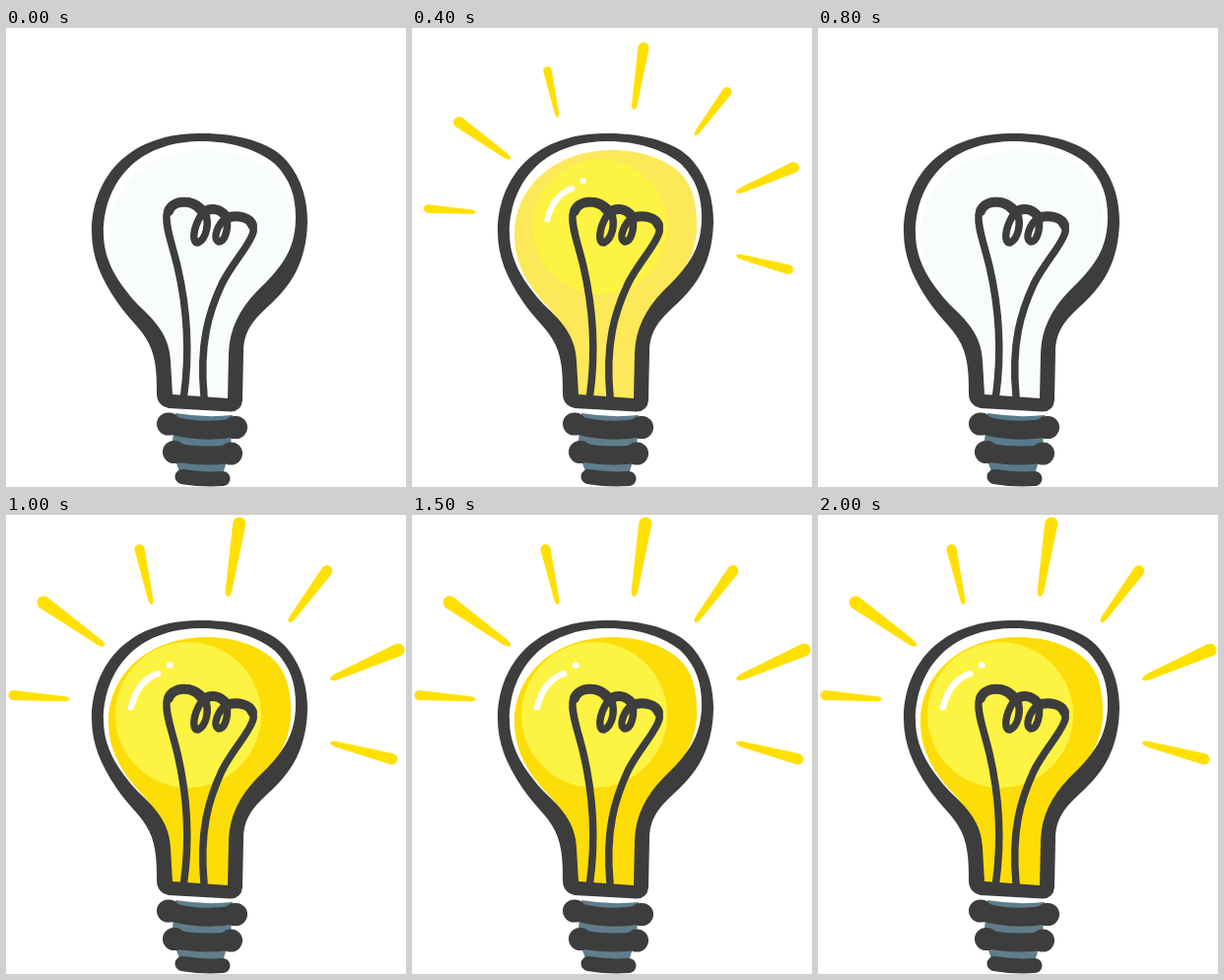
Recreate the animation shown at these times as an HTML page. Size 406 px wide and 466 px high, loop 2200 ms.

```html
<!DOCTYPE html>
<html lang="en">
<head>
<meta charset="utf-8">
<title>Light bulb</title>
<style>
  html, body { margin: 0; width: 100%; height: 100%; overflow: hidden; background: #fff; }
  svg { display: block; width: 100vw; height: 100vh; }
</style>
</head>
<body>
<svg viewBox="0 0 406 466">
  <defs>
    <path id="ray" d="M0 0Q1 -2.500 6 -3.200L73 -6.400A6.400 6.400 0 0 1 73 6.400L6 3.200Q1 2.500 0 0Z"/>
  </defs>
  <g id="rays" fill="#ffe000">
    <use href="#ray" transform="translate(65 187) rotate(184) scale(.79)"/>
    <use href="#ray" transform="translate(100 133) rotate(215.500) scale(1.04)"/>
    <use href="#ray" transform="translate(148 91) rotate(257.500) scale(.79)"/>
    <use href="#ray" transform="translate(225 83) rotate(279) scale(1.03)"/>
    <use href="#ray" transform="translate(287 109) rotate(306.500) scale(.89)"/>
    <use href="#ray" transform="translate(329 167) rotate(336.500) scale(1.03)"/>
    <use href="#ray" transform="translate(329 231) rotate(15) scale(.89)"/>
  </g>
  <path id="body" d="M200 124C228 123 257 132 272 147C286 161 290 182 289 206C287 236 270 255 252 273C235 294 230 310 230 335V380H164L162 335C160 310 150 296 133 278C116 258 104 238 104 210C104 165 140 126 200 124Z"/>
  <g id="glow">
    <circle r="74" fill="#fdf343"/>
    <g fill="none" stroke="#fff" stroke-linecap="round">
      <path d="M-58 -8Q-51 -35 -31 -42" stroke-width="6.500"/>
      <path d="M-19 -50.500h.5" stroke-width="6.500"/>
    </g>
  </g>
  <path id="metal" d="M172 391Q202 396 230 393L228 428L219 456H178L168 428Z"/>
  <g fill="none" stroke="#3d3d3d" stroke-linecap="round" stroke-linejoin="round">
    <path fill="#3d3d3d" fill-rule="evenodd" stroke="none" d="M195 107C228 106 268 114 285 135C301 154 306 176 306 197C305 238 289 261 270 279C250 297 241 308 241 330L240 378Q239 389 228 389.500L165 386Q153 383 153 371C153 348 152 331 142 315C135 303 124 295 112 277C96 253 87 232 87 207C87 158 118 108 195 107ZM195 115C125 117 99 165 99 208C99 236 113 258 134 281C151 297 166 312 167 338L169 372L225 376L226 330C227 305 237 286 254 268C279 244 294 226 294 192C294 172 289 154 273 138C256 123 225 114 195 115Z"/>
    <path stroke-width="7.500" d="M180.500 374C187 327 184 285 174 242C168 217 162 203 163 190C166 173 191 170 202 187C207 199 203 214 195 218C188 218 190 203 198 190C205 180 219 182 224 192C226 205 222 217 216 217C209 214 215 199 224 192C236 188 253 194 251 207C248 220 230 238 219 260C206 288 196 320 201 374"/>
    <path stroke-width="10" d="M165 186C169 175 188 173 197 184M201 187C207 182 217 183 223 191M226 192C236 190 247 192 250 200"/>
    <path stroke-width="19" d="M164 402Q200 413 235 405M169 430Q200 437 230 432"/>
    <path stroke-width="23" d="M164.500 402h1M232 405.500h1.500M170.500 430.500h1M228 432h.5"/>
    <path stroke-width="15" d="M179 455.500Q200 459 220 457.500"/>
  </g>
</svg>
<script>
const LOOP = 2200, WARM_UP = 500;
const $ = id => document.getElementById(id);
const show = (id, visible) => $(id).style.display = visible ? '' : 'none';

// Brightness climbs in five steps, then blinks: 300 ms on, 200 ms off.
function powerAt(t) {
  if (t < WARM_UP) return Math.floor(t / 100) / 5;
  return (t - WARM_UP) % 500 < 300 ? 1 : 0;
}

function draw(t) {
  const power = powerAt(t), on = power > 0;
  const spread = power ** 0.35, gap = 1 - spread;

  show('rays', on);
  show('glow', on);
  $('ray').setAttribute('transform', `scale(${power ** 0.75})`);
  $('glow').setAttribute('transform',
    `translate(${185 + 80 * gap} ${203 - 18 * gap}) scale(${spread})`);
  $('body').setAttribute('fill', on ? '#fddd08' : '#f8fdfc');
  $('body').setAttribute('opacity', on ? Math.max(0, (power - 0.4) / 0.6) : 1);
  $('metal').setAttribute('fill', on ? '#607d8b' : '#587b8c');
}

const start = performance.now();
function tick() {
  draw((performance.now() - start) % LOOP);
  requestAnimationFrame(tick);
}
tick();
</script>
</body>
</html>
```
